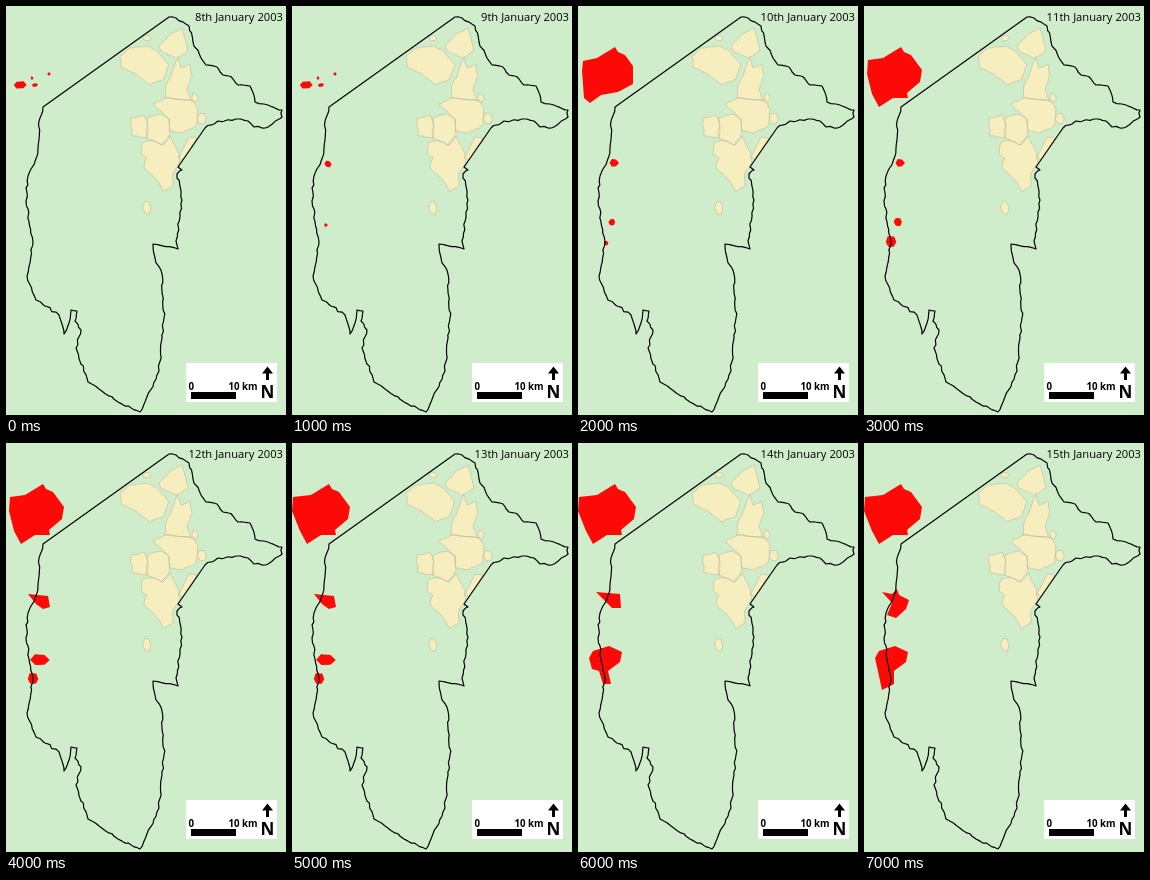
Write an HTML page that moves like this. It is 280x409 px and loops after 8 s.

```html
<!DOCTYPE html>
<html lang="en">
<head>
<meta charset="utf-8">
<style>
  html, body { margin: 0; width: 100%; height: 100%; overflow: hidden; background: #cfedcb; }
  svg { display: block; width: 280px; height: 409px; }
  text { font-family: "Open Sans", "Noto Sans", sans-serif; }
  .bold { font-weight: 700; }
</style>
</head>
<body>
<svg viewBox="0 0 280 409">
  <rect width="280" height="409" fill="#cfedcb"/>
  <path id="suburbs" fill="#f7eebf" stroke="#b5b196" stroke-width=".5"/>
  <path id="fire" fill="#fd0907"/>
  <path id="border" fill="none" stroke="#000" stroke-width="1.2" stroke-linejoin="round"/>
  <text id="date" x="277" y="15" font-size="11.2" text-anchor="end"></text>
  <rect x="180" y="357" width="91" height="39" fill="#fff"/>
  <rect x="185" y="386" width="45" height="7"/>
  <text class="bold" x="182.5" y="384" font-size="9.7">0</text>
  <text class="bold" x="222.5" y="384" font-size="9.7">10 km</text>
  <text class="bold" x="261.5" y="392" font-size="17" text-anchor="middle">N</text>
  <path d="M261.500 360.500L267 367.500H263V374H260V367.500H256Z"/>
</svg>
<script>
const byId = id => document.getElementById(id);
const closed = shapes => shapes.map(points => `M${points}Z`).join('');

let seed = 7;
const jitter = size => {
  seed = (seed * 16807) % 2147483647;
  return (seed / 2147483647 * 2 - 1) * size;
};

// Joins key points by wobbly lines with a bend every few pixels.
function rough(keys, size) {
  const points = keys.split(' ').map(pair => pair.split(',').map(Number));
  return points.flatMap(([x, y], i) => {
    const [nextX, nextY] = points[i + 1] ?? [x, y];
    const steps = Math.max(1, Math.round(Math.hypot(nextX - x, nextY - y) / 4));
    return Array.from({ length: steps }, (_, k) => {
      const wobble = k ? size : 0;
      return [x + (nextX - x) * k / steps + jitter(wobble), y + (nextY - y) * k / steps + jitter(wobble)];
    });
  }).join(' ');
}

// An irregular hexagon for the small patches.
const patch = (x, y, rx, ry = rx) => Array.from({ length: 6 }, (_, i) => {
  const angle = i * Math.PI / 3, reach = 1 + jitter(.15);
  return [x + rx * reach * Math.cos(angle), y + ry * reach * Math.sin(angle)];
}).join(' ');

// The two straight stretches of the border are left to the joins.
const east = '163,11 170,12 183,20 187,36 195,52 200,59 211,61 217,69 227,73 232,79 244,80 249,96 276,104 276,111 262,121 248,121 242,115 230,113 212,115 199,122';
const southWest = '172,161 176,164 171,168 176,194 170,235 172,243 147,238 149,252 156,268 158,312 153,365 134,406 112,396 82,376 70,342 75,324 69,315 71,305 65,304 63,317 58,328 53,309 30,294 21,270 27,236 20,195 22,170 31,150 34,112 37,101';
byId('border').setAttribute('d', closed([rough(east, 1.3) + ' ' + rough(southWest, 1)]));

byId('suburbs').setAttribute('d', closed([
  ...[
    '114,50 124,42 142,40 152,46 163,59 158,73 144,79 130,68 116,62 114,50',
    '153,40 164,28 176,22 182,45 170,52 155,45 153,40',
    '167,64 172,52 175,62 184,58 186,70 181,84 186,95 159,92 160,79 167,64',
    '147,98 159,92 187,95 192,103 190,120 176,127 164,125 163,113 147,98',
    '125,112 138,109 142,118 141,132 126,130 125,112',
    '141,112 155,108 163,113 164,128 156,139 141,132 141,112',
    '137,136 147,135 157,139 164,130 173,148 173,158 167,167 167,180 158,186 153,177 138,161 141,152 135,148 137,136'
  ].map(keys => rough(keys, .7)),
  '183,131 191,132 177,154 173,151',
  patch(141, 32, 4, 3), patch(189, 92, 3, 5), patch(196, 113, 5, 6), patch(141, 202, 4, 7)
]));

const northSpots = [patch(14, 79, 7, 4), patch(26, 72, 1.6), patch(29, 79, 3, 2), patch(43, 68, 1.6)];
const northRim = '19,52 37,41 40,46 47,49';
const northStart = `4,65 5,55 ${northRim} 55,60 55,78 40,86 23,89 12,97 6,92`;
const northGrown = west => `${west},68 ${west + 1},54 ${northRim} 58,64 56,76 43,87 44,92 29,92 15,101 8,88`;

const midSmall = patch(36, 157, 4.5);
const midGrown = '22,151 42,153 44,164 37,166 30,161';
const midWide = '18,149 42,151 43,165 34,165';
const midFull = '18,149 28,151 33,146 35,152 45,157 42,166 32,175 23,172 28,160';

const southGrown = patch(34, 217, 9.5, 6);
const tailGrown = patch(27, 236, 6);
const southTop = '11,215 15,208 31,203 44,209 42,219 30,228';
const southWide = southTop + ' 33,241 25,241 21,228 14,226';
const southFull = southTop + ' 30,241 18,247 15,233';

const firstDay = 8;
const days = [
  northSpots,
  [...northSpots, patch(36, 158, 3.5), patch(34, 219, 1.8)],
  [northStart, midSmall, patch(34, 216, 3.5), patch(28, 237, 2.5)],
  [northGrown(3), midSmall, patch(34, 216, 4), tailGrown],
  [northGrown(3), midGrown, southGrown, tailGrown],
  [northGrown(0), midGrown, southGrown, tailGrown],
  [northGrown(0), midWide, southWide],
  [northGrown(0), midFull, southFull]
];

let start;
function draw(now) {
  start ??= now;
  const day = Math.floor((now - start) / 1000) % days.length;
  byId('fire').setAttribute('d', closed(days[day]));
  byId('date').textContent = `${firstDay + day}th January 2003`;
  requestAnimationFrame(draw);
}
requestAnimationFrame(draw);
</script>
</body>
</html>
```
